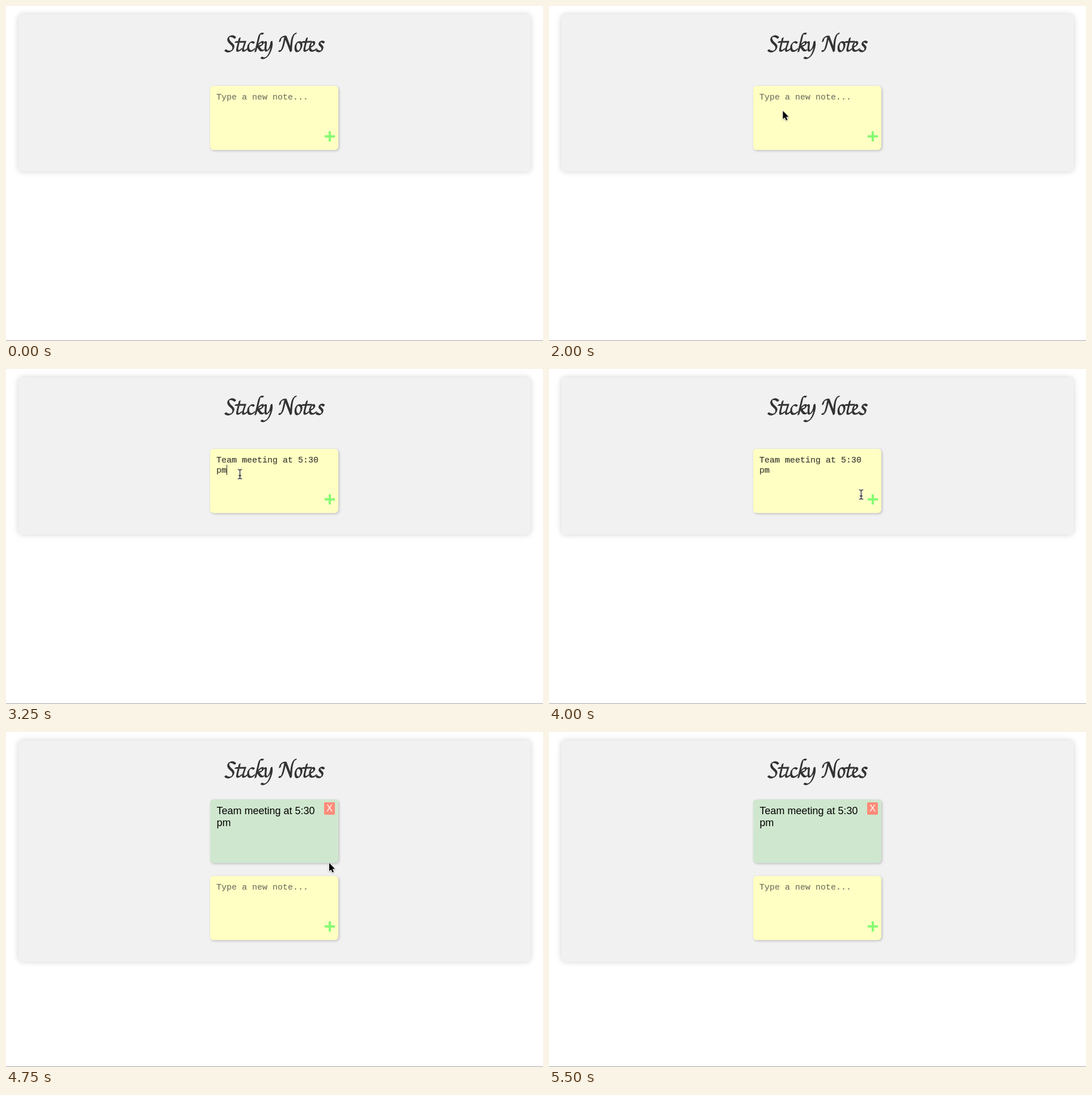
Write an HTML page with a canvas that moves like this. It is 947 px wide and 591 px high and loops after 8 s.

```html
<!DOCTYPE html>
<html lang="en">
<head>
<meta charset="utf-8">
<title>Sticky Notes</title>
<style>
  html, body { margin: 0; width: 100%; height: 100%; overflow: hidden; background: #fff; }
  #stage { position: relative; width: 947px; height: 591px; overflow: hidden; }
  #stage * { position: absolute; margin: 0; box-sizing: border-box; }

  /* Every part shares one stepped 8 s clock. */
  .anim { animation: 8s step-end infinite; }

  .panel {
    left: 22px; top: 15px; width: 902.5px; height: 277px; border-radius: 7px;
    background: #f1f1f1; box-shadow: 0 0 11px rgba(0, 0, 0, .18); animation-name: grow;
  }
  h1 {
    left: 386px; top: 46px; width: 176px; height: 48px; color: transparent;
    font: italic 32px/48px "Noto Serif", serif; white-space: nowrap; overflow: hidden;
  }
  #title { left: 376px; top: 36px; }
  .rule { left: 0; top: 590px; width: 947px; height: 1px; background: #a5a3a5; }

  .note {
    left: 360px; width: 225.5px; height: 112.5px; border-radius: 6px;
    box-shadow: 1.5px 1.5px 4px rgba(0, 0, 0, .22);
  }
  .saved { top: 118.5px; background: #d0e7cf; animation-name: saved; }
  .entry { top: 141px; background: #ffffc3; animation-name: drop; }
  .note p { white-space: pre; }
  .saved p { left: 11.5px; top: 10.5px; font: 18px/21px "Liberation Sans", Arial, sans-serif; color: #000; }
  .entry p {
    left: 11px; top: 12px; font: 15px/18px "Liberation Mono", "Courier New", monospace;
    -webkit-text-stroke: .2px currentColor;
  }
  .hint { color: #757567; animation-name: hint; }
  .typed { color: #3c3c36; animation-name: typed; }
  .caret { left: 12px; top: 11px; width: 1px; height: 18px; background: #222; animation-name: caret; }
  .close {
    left: 201px; top: 5.5px; width: 19px; height: 22px; border-radius: 2px;
    background: #fd8c7a; color: #fff; text-align: center;
    font: 16px/22px "Liberation Sans", Arial, sans-serif;
  }
  .plus { left: 201.5px; top: 80px; width: 18px; height: 18px; color: #86fb72; animation-name: hover; }
  .plus i { background: currentColor; }
  .plus i:first-child { left: 0; top: 7px; width: 18px; height: 4px; }
  .plus i:last-child { left: 7px; top: 0; width: 4px; height: 18px; }

  .cursor { left: 0; top: 0; width: 1px; height: 1px; overflow: visible; }
  .arrow { animation-name: arrow; filter: drop-shadow(0 1px 1px rgba(0, 0, 0, .3)); }
  .beam { animation-name: beam; }
  .hand { animation-name: hand; filter: drop-shadow(0 1px 1px rgba(0, 0, 0, .25)); }

  @keyframes grow { 0% { height: 277px } 59.375%, 100% { height: 390px } }
  @keyframes saved { 0% { visibility: hidden } 59.375%, 100% { visibility: visible } }
  @keyframes drop { 0% { top: 141px } 59.375%, 100% { top: 254px } }
  @keyframes hint {
    0% { visibility: visible } 40.625% { visibility: hidden } 59.375%, 100% { visibility: visible }
  }
  @keyframes typed {
    0% { visibility: hidden } 40.625% { visibility: visible } 59.375%, 100% { visibility: hidden }
  }
  @keyframes caret {
    0% { opacity: 0; transform: none }
    28.125% { opacity: 1; transform: none }
    34.375% { opacity: 0; transform: none }
    40.625% { opacity: 1; transform: translate(17px, 17px) }
    46.875% { opacity: 0; transform: translate(17px, 17px) }
    53.125% { opacity: 1; transform: translate(17px, 17px) }
    56.25%, 100% { opacity: 0; transform: none }
  }
  @keyframes hover {
    0% { transform: none; color: #86fb72 }
    53.125% { transform: scale(1.12); color: #66fb4d }
    59.375%, 100% { transform: none; color: #86fb72 }
  }
  @keyframes arrow {
    0% { opacity: 0; transform: none }
    18.75% { opacity: 1; transform: translate(454px, 259px) }
    21.875% { opacity: 1; transform: translate(404px, 198px) }
    25% { opacity: 1; transform: translate(412.5px, 185px) }
    31.25% { opacity: 0; transform: none }
    59.375% { opacity: 1; transform: translate(570px, 231px) }
    65.625% { opacity: 1; transform: translate(826px, 239px) }
    68.75%, 100% { opacity: 0; transform: none }
  }
  @keyframes beam {
    0% { opacity: 0; transform: none }
    31.25% { opacity: 1; transform: translate(412.5px, 185.5px) }
    46.875% { opacity: 1; transform: translate(519.5px, 203.5px) }
    50% { opacity: 1; transform: translate(550.5px, 221.5px) }
    53.125%, 100% { opacity: 0; transform: none }
  }
  @keyframes hand { 0% { opacity: 0 } 53.125% { opacity: 1 } 59.375%, 100% { opacity: 0 } }
</style>
</head>
<body>
<div id="stage">
  <div class="panel anim"></div>
  <h1>Sticky Notes</h1>
  <canvas id="title" width="196" height="68" aria-hidden="true"></canvas>

  <div class="note saved anim">
    <p>Team meeting at 5:30
pm</p>
    <span class="close">X</span>
  </div>

  <div class="note entry anim">
    <p class="hint anim">Type a new note...</p>
    <p class="typed anim">Team meeting at 5:30
pm</p>
    <div class="caret anim"></div>
    <div class="plus anim"><i></i><i></i></div>
  </div>

  <div class="rule"></div>

  <svg class="cursor arrow anim">
    <path d="M0 0V14.4L3.3 11.4 5.6 16.8 8 15.7 5.7 10.5H10.1Z"
      stroke="#fff" stroke-width="1.6" stroke-linejoin="round" paint-order="stroke"/>
  </svg>
  <svg class="cursor beam anim" fill="none">
    <defs>
      <path id="ibeam" d="M-3.7-8.3C-1.4-8.3 0-7.6 0-6V6C0 7.6-1.4 8.3-3.7 8.3M3.7-8.3C1.4-8.3 0-7.6 0-6M0 6C0 7.6 1.4 8.3 3.7 8.3M-2.3 2.5H2.3"/>
    </defs>
    <use href="#ibeam" stroke="#fff" stroke-width="3"/>
    <use href="#ibeam" stroke="#111" stroke-width="1.3"/>
  </svg>
  <svg class="cursor hand anim" fill="#fff" stroke="#111" stroke-width="1.1" stroke-linejoin="round">
    <path d="M569.8 241.5L568 234.3C567.4 231.2 570.8 230.9 571.5 233.8L572.6 238C573.2 236.3 575.6 236.6 576 238.4C576.8 237 578.8 237.6 579 239.3C580.2 238.6 581.4 239.4 581.2 241.3C581 245 579.4 246 579 249H571C570 246 567 244.6 564.9 241.2C564.3 238.8 567.4 238.5 569.8 241.5Z"/>
    <path d="M573 241.5V246M575.5 241.5V246M578 241.5V246" stroke-width=".9"/>
  </svg>
</div>

<script>
  // Heading lettering: pen skeletons, stroked with a slanted flat nib.
  const letters = {
    S: "M404 56C399 51 391 53 392 59C393 66 402 67 401 73C400 81 391 82 387 78",
    ti: "M412 57L407.8 75C406.8 81 411 80 415 76M405 63.5L422 63L418 75C417 81 421 80 425 76",
    c: "M437 65C433 61 427 66 427 73C427 81 433 81 438 76",
    k: "M440 80L446 55C447 49 450 47.5 453 49M442 72C447 64 453 61 453 65C453 69 448 71 444 71C447 74 449 81 454 78",
    y: "M456 64C461 61 456 75 458 78C460 82 467 74 468 63C470 72 465 88 457 91.5C454 93 452 92 450.5 91",
    N: "M482 79C486 82 489 72 492 56M483 62C484 55 489 53 493 54L502.5 79.5C503 66 504 50 511 48.5",
    o: "M517 63.5C510 63 508 79 514 80C521 80 524 64 517 63.5",
    t: "M530.5 57L526.3 75C525.3 81 529.5 80 533.5 76M522.5 63.5L538 63",
    e: "M537 72C542 71 545 67 543 64C539 61 535 69 536 75C537 81 543 80 547 76",
    s: "M560.5 64.5C557 61 552 63 553 67C554 70 559 71 558 75C557 81 551 81 548 78"
  };
  const pen = document.getElementById("title").getContext("2d");
  const nib = new DOMMatrix().rotate(-40).scale(1, 0.42);
  const page = new DOMMatrix().translate(-376, -36);

  pen.strokeStyle = "#333";
  pen.lineWidth = 4.3;
  pen.lineCap = pen.lineJoin = "round";
  pen.setTransform(nib);
  for (const d of Object.values(letters)) {
    const path = new Path2D();
    path.addPath(new Path2D(d), nib.inverse().multiply(page));
    pen.stroke(path);
  }
</script>
</body>
</html>
```
